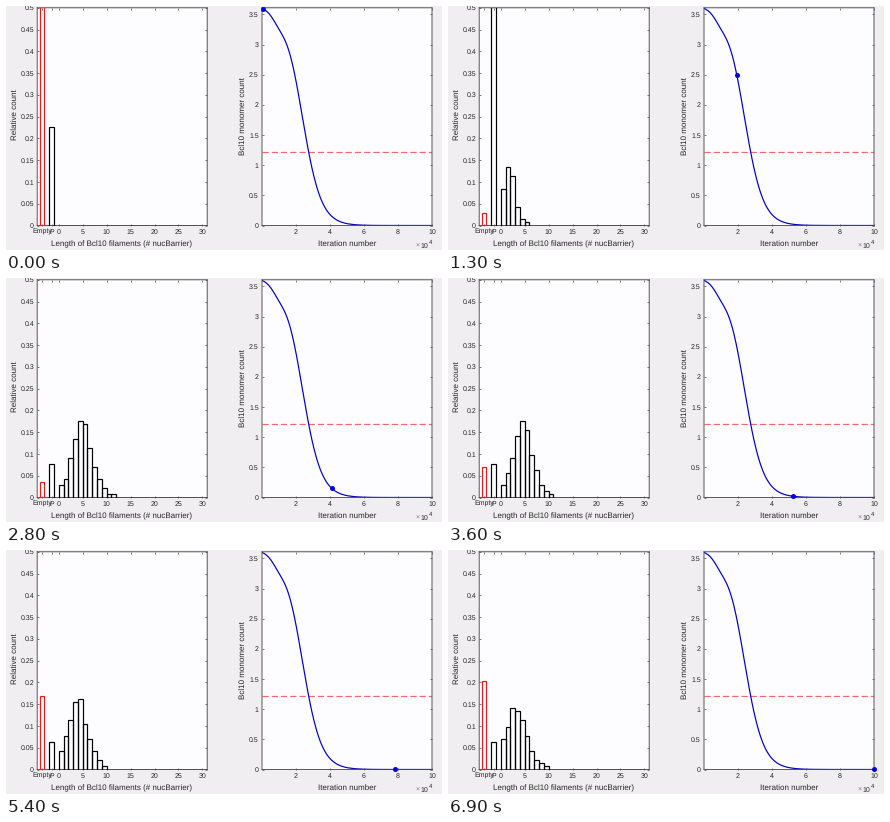
A matplotlib script that plays this animation: 436 by 244 pixels, repeating every 7000 ms.

```python
import numpy as np
import matplotlib
import matplotlib.pyplot as plt
from matplotlib.animation import FuncAnimation

W, H, DPI = 436, 244, 100
FRAMES, INTERVAL = 70, 100
SITES = 142                      # filaments counted in the histogram
BINS = 30                        # filament lengths shown
INK, FRAME_INK, BLUE = "#262626", "#4a4a4a", "#0000c0"

matplotlib.rcParams["font.family"] = "Liberation Sans"
matplotlib.rcParams["text.hinting"] = "none"
matplotlib.rcParams["text.hinting_factor"] = 1

noise = np.random.default_rng(4).normal(0, 0.15, (FRAMES, BINS))


def pt(px):
    """Pixels to points."""
    return px * 72 / DPI


def smooth(t):
    t = np.clip(t, 0, 1)
    return t * t * (3 - 2 * t)


def shares(frame):
    """Shares of empty sites, P sites and each filament length."""
    empty = 0.775 * np.exp(-0.34 * frame)
    empty += 0.02 * smooth(frame / 7) + 0.185 * smooth((frame - 18) / 51)
    waiting = 0.08 + 0.92 / (1 + np.exp((frame - 13.6) / 2.5))
    p = (1 - empty) * waiting

    # A hump of lengths that grows, then slowly shrinks back
    stages = [7, 18, 28, 44, 69]
    center = np.interp(frame, stages, [-0.6, 2.7, 4.3, 4.0, 2.6])
    spread = np.interp(frame, stages, [0.9, 2.5, 2.9, 2.6, 3.0])
    hump = np.exp(-np.abs((np.arange(BINS) - center) / spread) ** 1.6)
    counts = SITES * (1 - empty - p) * hump / hump.sum()
    counts += noise[frame] * np.sqrt(counts)
    return np.round(np.r_[SITES * empty, SITES * p, counts]) / SITES


def monomers(x):
    """Monomer count at iteration x * 10^4."""
    decay = 3.655 / (1 + np.exp(1.8 * (x - 2.36)))
    return decay - 0.11 * np.exp(-((x - 1) / 0.55) ** 2)


fig = plt.figure(figsize=(W / DPI, H / DPI), dpi=DPI, facecolor="#f0eef0")


def panel(left, right, xlim, ylim):
    top, bottom = 1.8, 219.5
    ax = fig.add_axes([left / W, 1 - bottom / H, (right - left) / W, (bottom - top) / H],
                      facecolor="#fdfcfe")
    ax.set(xlim=xlim, ylim=ylim)
    ax.tick_params(direction="in", top=True, right=True, length=pt(1.9), width=pt(0.7),
                   color=FRAME_INK, labelcolor=INK, labelsize=pt(7.2), pad=pt(3.2))
    for spine in ax.spines.values():
        spine.set(color=FRAME_INK, linewidth=pt(0.9), snap=False)
    return ax


def label(x, y, text, size=7.85, color=INK, **kw):
    fig.text(x / W, 1 - y / H, text, fontsize=pt(size), color=color,
             ha="center", va="center", **kw)


hist = panel(31.2, 201.2, (-4.5, 31), (0, 0.5))
lengths = range(0, 31, 5)
hist.set_xticks([-3.5, -1.5, *lengths], ["Empty", "P", *map(str, lengths)])
y_ticks = np.arange(11) * 0.05
hist.set_yticks(y_ticks, [f"{v:.2g}" for v in y_ticks])

trace = panel(256, 426, (0, 10), (0, 3.61))
trace.set_xticks(range(2, 11, 2))
y_ticks = np.arange(8) * 0.5
trace.set_yticks(y_ticks, [f"{v:g}" for v in y_ticks])

label(116, 237.8, "Length of Bcl10 filaments (# nucBarrier)")
label(341.5, 237.8, "Iteration number")
label(8.6, 108.8, "Relative count", 8, rotation=90)
label(237, 109.8, "Bcl10 monomer count", 8, rotation=90)
label(411.5, 240, "×", 6.8, "#777777")
label(418.3, 239.7, "10", 7.1)
label(424.8, 236, "4", 5.7)

lefts = [-4, -2, *range(BINS)]
bars = hist.bar(lefts, np.zeros(len(lefts)), width=1, align="edge", fill=False,
                edgecolor="black", linewidth=pt(1.2), zorder=3)
bars[0].set(edgecolor="#e02020", linewidth=pt(1.2))

xs = np.linspace(0, 10, 400)
trace.axhline(1.222, color="#f06a6a", lw=pt(1.2), dashes=(5.2, 2.5))
trace.plot(xs, monomers(xs), color=BLUE, lw=pt(1.2))
dot, = trace.plot([], [], "o", color="#0000e0", ms=pt(5), mew=0, clip_on=False, zorder=5)


def draw(frame):
    for bar, share in zip(bars, shares(frame)):
        bar.set_height(share)
    x = 0.06 + 9.94 * frame / (FRAMES - 1)
    dot.set_data([x], [monomers(x)])
    return [*bars, dot]


anim = FuncAnimation(fig, draw, frames=FRAMES, interval=INTERVAL, repeat=True,
                     repeat_delay=0, blit=False)
plt.show()
```
